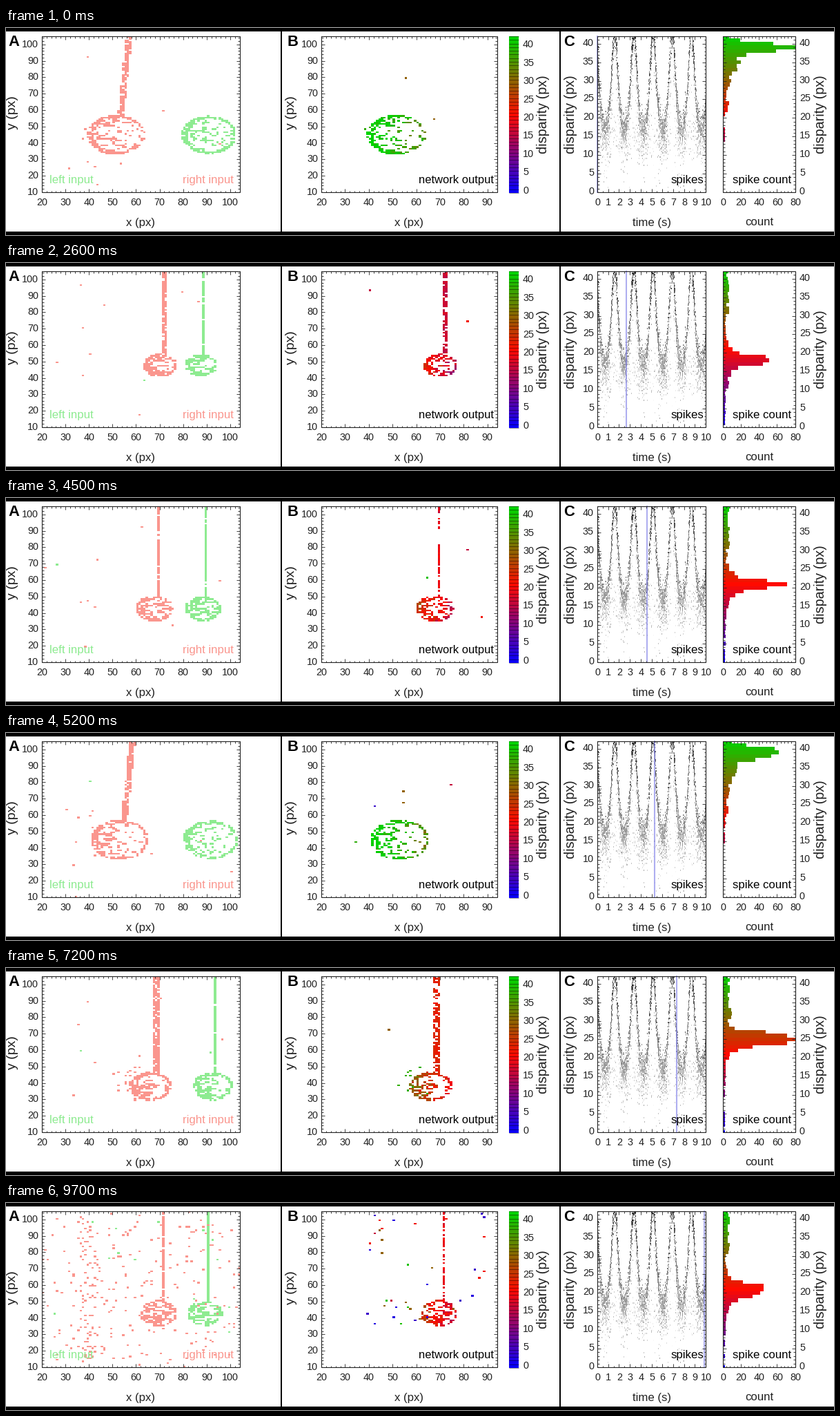
Write a matplotlib script that moves like this. It is 1200 by 300 pixels and loops after 9800 ms.

```python
import numpy as np
import matplotlib.pyplot as plt
from matplotlib.animation import FuncAnimation
from matplotlib.collections import LineCollection
from matplotlib.patches import Rectangle

W, H, FRAMES, STEP = 1200, 300, 98, 100
PERIOD, APEX = 1.77, -0.16
RED, GREEN, INK = (250, 150, 142), (142, 235, 145), "#222222"
TOP, BOTTOM = 12, 238
UNIT_A, UNIT_B, UNIT_Y = 3.412, 3.44, 2.379
UNIT_D = (BOTTOM - TOP) / 42

X, Y = np.meshgrid(np.arange(20, 104), np.arange(10, 105))

plt.rcParams["font.family"] = "Liberation Sans"
fig = plt.figure(figsize=(W / 100, H / 100), dpi=100, facecolor="white")
ax = fig.add_axes([0, 0, 1, 1])
ax.axis("off")


def color(v):
    """Disparity to RGB: blue, red, green."""
    stops = [0, 21, 42]
    ramps = [10, 255, 0], [0, 10, 212], [250, 0, 0]
    return np.stack([np.interp(v, stops, r) for r in ramps], axis=-1) / 255


def swing(t):
    """Phase and disparity of the pendulum; depth is sinusoidal."""
    phase = 2 * np.pi * (t - APEX) / PERIOD
    return phase, 1 / (0.0408 - 0.018 * np.cos(phase))


def text(x, y, s, size=16.8, col=INK, **kw):
    opts = dict(ha="center", va="center", zorder=6)
    opts.update(kw)
    ax.text(x, y, s, fontsize=size * 0.72, color=col, **opts)


def image(data, left, right, top=TOP, bottom=BOTTOM, z=2):
    return ax.imshow(data, extent=(left, right, bottom, top), origin="lower",
                     interpolation="nearest", aspect="auto", zorder=z)


def frame_box(left, right, xs, ys, x_major, y_major):
    """Axis box with inward ticks on all four sides."""
    ax.add_patch(Rectangle((left, TOP), right - left, BOTTOM - TOP,
                           fill=False, ec=INK, lw=0.8, zorder=5))
    segs = []
    for k, x in enumerate(xs):
        n = 5 if k % x_major == 0 else 2.5
        segs += [[(x, BOTTOM), (x, BOTTOM - n)], [(x, TOP), (x, TOP + n)]]
    for k, y in enumerate(ys):
        n = 5 if k % y_major == 0 else 2.5
        segs += [[(left, y), (left + n, y)], [(right, y), (right - n, y)]]
    ax.add_collection(LineCollection(segs, colors=INK, linewidths=0.6, zorder=5))


def pixel_panel(left, right, unit, last, letter, letter_x):
    xs = left + unit * np.arange(0, (right - left) / unit, 2)
    ys = BOTTOM - UNIT_Y * np.arange(0, 95, 2)
    frame_box(left, right, xs, ys, 5, 5)
    for v in range(20, last + 1, 10):
        text(left + unit * (v - 20), 253, str(v), 14.4)
    for v in range(10, 101, 10):
        text(left - 5, BOTTOM - UNIT_Y * (v - 10), str(v), 14.4, ha="right")
    text((left + right) / 2, 282, "x (px)")
    text(letter_x - 1, 123, "y (px)", 19.5, rotation=90)
    text(letter_x, 21, letter, 22, "black", weight="bold")


def disparity_panel(left, right, xs, x_major):
    ys = BOTTOM - UNIT_D * np.arange(0, 42)
    frame_box(left, right, xs, ys, x_major, 5)


def disparity_labels(x, zero, unit, ha):
    for v in range(0, 41, 5):
        text(x, zero - unit * v, str(v), 14.4, ha=ha)


def spike_map():
    rng = np.random.default_rng(4)
    t, v = np.meshgrid((np.arange(157) + 0.5) / 15.7,
                       (np.arange(113) + 0.5) * 42 / 113)
    d = swing(t)[1]
    off = v - d
    core = np.exp(-(off / 2.3) ** 2 / 2)
    tail = np.where(off < 0, np.exp(off / 5), 0)
    strength = 0.3 + 0.65 * (v / 42) ** 1.5
    dark = (rng.random(t.shape) < 0.85 * core) * strength * rng.uniform(0.4, 1, t.shape)
    haze = (rng.random(t.shape) < 0.4 * tail) * 0.35 * rng.random(t.shape)
    low = np.exp(-((v - 15) / 3.5) ** 2 / 2) * np.where(d < 26, 1, 0.35)
    dust = (rng.random(t.shape) < 0.35 * low) * 0.28 * rng.random(t.shape)
    gray = 1 - np.maximum.reduce([dark, haze, dust])
    return np.repeat(gray[..., None], 3, axis=2)


def ball(cx, cy, r, fill, rng):
    u, v = (X - cx) / r, (Y - cy) / r
    rho = np.hypot(u, v)
    noise = rng.random(X.shape)
    streak = (noise + np.roll(noise, 1, axis=1)) / 2 < np.sqrt(fill(u) / 2)
    rim = np.abs(rho - 0.94) * r < 0.95 - 0.4 * u
    return (rim & (rng.random(X.shape) < 0.8)) | ((rho < 0.86) & streak)


def string(x0, lean, y0, width, p, rng):
    rise = (Y - y0) / (105 - y0)
    near = np.abs(X - x0 - lean * rise) < width
    return near & (rise >= 0) & (rng.random(X.shape) < p)


def scatter(mask, xs, ys):
    c, r = np.round(xs).astype(int) - 20, np.round(ys).astype(int) - 10
    ok = (c >= 0) & (c < X.shape[1]) & (r >= 0) & (r < X.shape[0])
    mask[r[ok], c[ok]] = True


def rgba(mask, rgb):
    out = np.zeros(mask.shape + (4,))
    out[..., :3] = rgb
    out[..., 3] = mask
    return out


def histogram(d, rng):
    v = np.arange(43)
    peak = min(d, 41)
    off = v - peak
    if d > 31:
        count = 45 * np.exp(-(off / 1.3) ** 2 / 2)
        count += np.where(off <= 0, 30 * np.exp(off / 6.5), 24 * np.exp(-off / 2))
        count += 4 * np.exp(-((v - 23) / 1.3) ** 2)
    else:
        high = 40 + 48 * np.exp(-((d - 26) / 3) ** 2)
        count = high * np.exp(-(off / 1.3) ** 2 / 2)
        count += 16 * np.exp(-np.abs(off) / 4) + np.where(v > 30, 6, 1)
    count = count * rng.uniform(0.65, 1.25, 43) + (rng.random(43) < 0.5)
    bars = np.arange(80)[None, :] + 0.5 < count[:, None]
    return rgba(bars, color(v)[:, None, :])


def state(i):
    rng = np.random.default_rng(500 + i)
    t = i * 10 / FRAMES
    phase, d = swing(t)
    c, s = np.cos(phase), np.sin(phase)
    r = 2 + 0.255 * d
    cx = 63.2 - 0.87 * (d - 26.5) + 0.3 * (t - 4) + 0.7 * s
    cy = 36.3 + np.hypot(0.8, 11.2 * (c - 0.12))
    gx = 90.6 + 0.15 * (t - 4) + 1.4 * s - 0.35 * max(0, 24 - d)
    lean = 0.35 * max(0, d - 29)
    burst = np.exp((i - FRAMES + 1) / 0.8)
    falling = max(0, s)

    def fill(u):
        return np.clip(0.27 + 0.25 * (d < 24) + 0.3 * falling ** 4 * (u < 0)
                       - 0.12 * (u > 0.2), 0.05, 0.5)

    ball_red = ball(cx, cy, r, fill, rng)
    line_red = string(cx + 1.5, lean, cy + 0.9 * r, 1.1 + 0.4 * s, 0.86, rng)
    red = ball_red | line_red
    p = np.clip((38.5 - d) / 2.5 + 0.2 * (s < 0), 0, 0.95)
    left = ball(gx, cy, 0.95 * r, fill, rng)
    left |= string(gx + 0.6, 0, cy + 0.85 * r, 0.55, p, rng)

    # Stray events, thickest behind the falling ball and at the end.
    n = int(30 * falling ** 4)
    tail_x = rng.normal(cx - r, 4.5, n)
    tail_y = rng.normal(cy + 4, 6, n)
    scatter(red, tail_x, tail_y)
    k = int(rng.integers(2, 7) + 70 * burst)
    scatter(red, rng.normal(39, 2.5, k), rng.uniform(12, 104, k))
    red |= rng.random(X.shape) < 0.0005 + 0.026 * burst
    k = int(rng.integers(1, 4) + 12 * burst)
    scatter(left, rng.uniform(22, 103, k), rng.uniform(30, 104, k))

    pair = (ball_red & (rng.random(X.shape) < 0.85)) | \
           (line_red & (rng.random(X.shape) < 0.8 * p))
    value = d - 5 * (X - cx) / r * (Y < cy + r) + rng.normal(0, 2, X.shape)
    value = np.where(line_red & (Y > cy + r), d - 1.5 + rng.normal(0, 1, X.shape), value)
    stray = np.zeros(X.shape, bool)
    scatter(stray, tail_x[::3], tail_y[::3])
    value = np.where(stray, 38, value)
    k = int(rng.integers(2, 6) + 34 * burst)
    odd = np.zeros(X.shape, bool)
    scatter(odd, rng.uniform(36, 93, k), rng.uniform(35, 104, k))
    odd &= ~pair
    value = np.where(odd, rng.choice([2, 4, 16, 22, 30, 40], X.shape), value)
    return t, red, left, pair | stray | odd, value, histogram(d, rng)


# Page rules
for box in [(0, 0, W, 4.5), (0, 295, W, 5), (397.5, 0, 2, H), (802, 0, 2, H)]:
    ax.add_patch(Rectangle(box[:2], *box[2:], fc="black", lw=0, zorder=8))

# Panels A and B
pixel_panel(52, 338.5, UNIT_A, 100, "A", 11)
pixel_panel(457, 711.5, UNIT_B, 90, "B", 415)
text(94.5, 220, "left input", col=np.array(GREEN) / 255)
text(293, 220, "right input", col=np.array(RED) / 255)
text(652, 220, "network output", 16.5, "black")

# Color scale
image(color(np.arange(43))[:, None, :], 729, 743, TOP, 239)
scale_lines = [[(729, y), (743, y)] for y in np.linspace(TOP, 239, 44)]
ax.add_collection(LineCollection(scale_lines, colors="black", alpha=0.45,
                                 linewidths=0.7, zorder=4))
disparity_labels(749, 235.5, 5.28, "left")
text(779, 125, "disparity (px)", 19.8, rotation=90)

# Panel C
text(816, 20, "C", 22, "black", weight="bold")
disparity_panel(857, 1014, 857 + 15.7 * np.arange(0, 10.1, 0.5), 2)
disparity_panel(1039, 1143.5, 1039 + 1.306 * np.arange(0, 80, 4), 5)
image(spike_map(), 857, 1014)
disparity_labels(852, 237, UNIT_D, "right")
disparity_labels(1150, 237, UNIT_D, "left")
for v in range(11):
    text(857.5 + 15.7 * v, 253, str(v), 14.4)
for v in range(0, 81, 20):
    text(1039.5 + 1.306 * v, 253, str(v), 14.4)
for x in (819, 1180):
    text(x, 125, "disparity (px)", 19.8, rotation=90)
text(936, 282, "time (s)")
text(1092, 282, "count")
text(987, 221, "spikes", col="black")
text(1095.5, 221, "spike count", col="black")

blank = np.zeros(X.shape + (4,))
left_im = image(blank, 52, 338.5)
red_im = image(blank, 52, 338.5, z=3)
out_im = image(blank[:, :74], 457, 711.5)
bars_im = image(np.zeros((84, 80, 4)), 1039, 1143.5)
cursor, = ax.plot([], [], color="#7878e6", lw=1.5, alpha=0.6, zorder=4)
ax.set_xlim(0, W)
ax.set_ylim(H, 0)


def update(i):
    t, red, left, pair, value, bars = state(i)
    red_im.set_data(rgba(red, np.array(RED) / 255))
    left_im.set_data(rgba(left, np.array(GREEN) / 255))
    out_im.set_data(rgba(pair, color(value))[:, :74])
    # Bars are centred on whole values, so half of the end rows is cut.
    bars_im.set_data(np.repeat(bars, 2, axis=0)[1:-1])
    x = 857 + 15.7 * t
    cursor.set_data([x, x], [TOP, BOTTOM])
    return red_im, left_im, out_im, bars_im, cursor


anim = FuncAnimation(fig, update, frames=FRAMES, interval=STEP,
                     repeat=True, repeat_delay=0)
plt.show()
```
